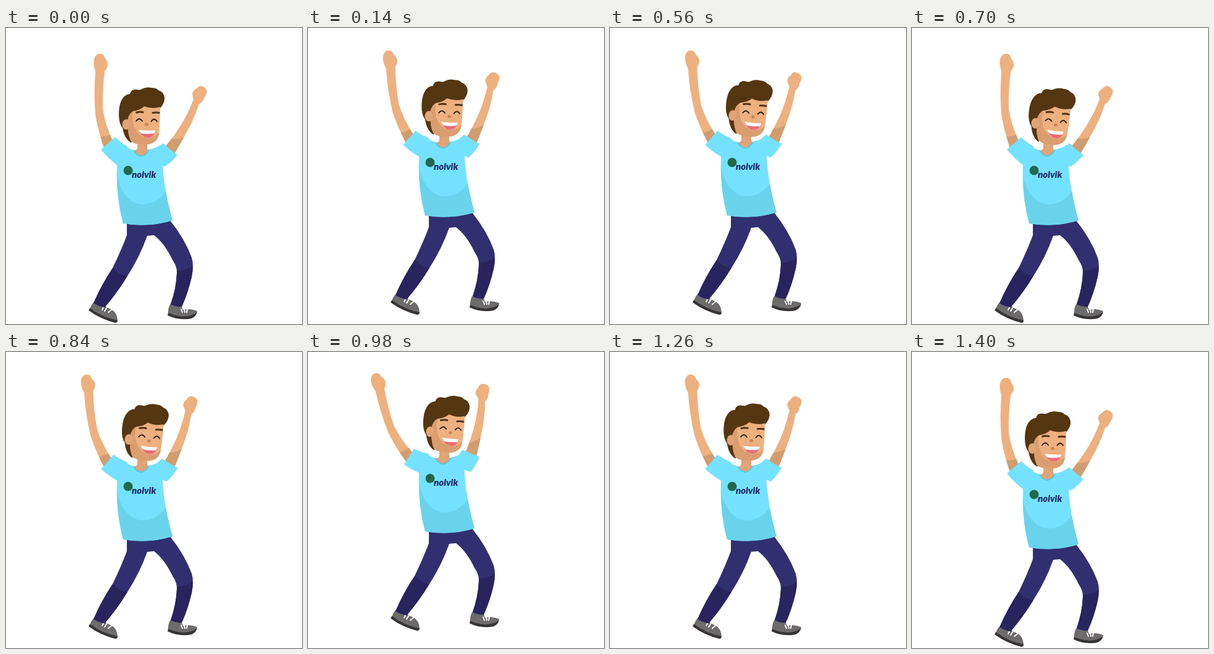
Write an HTML page that moves like this. It is 480 by 480 pixels and loops after 1470 ms.

```html
<!DOCTYPE html>
<html lang="en">
<head>
<meta charset="utf-8">
<title>Cheering dancer</title>
<style>
html, body { margin: 0; width: 100%; height: 100%; overflow: hidden; background: #fff; }
svg { display: block; width: 100vw; height: 100vh; }
</style>
</head>
<body>
<svg viewBox="0 0 480 480">
  <defs>
    <clipPath id="torsoClip"><use href="#torso"/></clipPath>
    <clipPath id="faceClip"><use href="#face"/></clipPath>
    <clipPath id="legsClip"><use href="#legs"/></clipPath>
    <clipPath id="armLClip"><use href="#skinL"/></clipPath>
    <clipPath id="armRClip"><use href="#skinR"/></clipPath>
  </defs>
  <g id="body">
    <!-- shoes -->
    <path fill="#6d6b6c" d="M143 444 L160 450 Q166 455 172 457 Q180 462 181 474 L179 476 Q156 469 136 456 Q138 448 143 444Z"/>
    <path fill="#363435" d="M136 454 Q155 469 181 474 Q181 478 177 478 Q153 472 134 458Z"/>
    <path fill="#6d6b6c" d="M266 448 L284 449 L287 457 Q299 454 310 459 Q310 464 303 468 L288 470 L263 465 Q262 456 266 448Z"/>
    <path fill="#363435" d="M263 462 Q274 467 288 468 Q302 467 310 461 Q308 468 301 471 Q281 475 262 466Z"/>
    <path stroke="#fff" stroke-width="2" stroke-linecap="round" fill="none"
      d="M160 449 L156 457 M165 451 L160 459 M172 456 L166 461 M284 456 L286 461 M289 456 L290 461 M294 456 L293 461"/>
    <!-- trousers -->
    <path id="legs" fill="#312f6f" d="M196 312 L266 312 Q290 342 301 372 Q305 384 301 404 Q295 430 285 452 Q275 452 267 448 Q276 422 277 398 Q278 388 270 376 Q257 349 240 336 L229 337 Q217 371 197 402 Q180 430 160 453 Q149 451 142 446 Q155 416 173 389 Q187 360 196 336Z"/>
    <path clip-path="url(#legsClip)" fill="#29245d" d="M173 389 Q183 401 200 403 L165 460 L130 450Z M270 393 Q289 396 305 384 L305 460 L260 455Z"/>
    <!-- arms -->
    <g class="armR">
      <path id="skinR" fill="#eeb07f" d="M304 116 L302 107 Q303 101 308 99 Q312 94 317 94 Q325 97 326 103 Q325 109 321 114 Q319 121 313 123 Q304 151 289 176 Q281 191 268 212 L254 198 Q276 171 288 150 Q298 132 304 116Z"/>
      <path clip-path="url(#armRClip)" fill="#d19d70" d="M264 179 Q282 182 295 173 L290 215 L250 215Z"/>
    </g>
    <g class="armL">
      <path id="skinL" fill="#eeb07f" d="M145 70 Q141 59 143 50 Q145 44 150 42 Q156 41 159 45 L161 50 Q165 54 165 61 Q163 67 160 70 Q156 102 157 132 Q161 157 173 183 L163 205 Q150 172 145 141 Q142 107 145 70Z"/>
      <path clip-path="url(#armLClip)" fill="#d19d70" d="M145 175 Q158 179 176 170 L185 210 L150 210Z"/>
    </g>
    <!-- shirt and neck -->
    <path id="torso" fill="#74e2fe" d="M190 189 Q198 196 207 198 Q219 215 232 197 Q243 195 250 190 L254 222 Q256 262 270 312 Q232 324 190 317 Q178 273 180 222Z"/>
    <path clip-path="url(#torsoClip)" fill="#6ad3ec" d="M178 226 C182 266 202 286 222 286 Q246 286 263 260 L280 330 H170Z"/>
    <path fill="#e0a476" d="M213 178 H229 V194 Q229 198 232 198 Q219 215 207 199 Q213 198 213 194Z"/>
    <path fill="none" stroke="#5cc3dc" stroke-width="2" d="M207 199 Q219 217 232 198"/>
    <path class="armL" fill="#74e2fe" d="M177 177 L154 197 Q166 212 181 223 L198 215 L197 192 Q186 186 177 177Z"/>
    <path class="armR" fill="#74e2fe" d="M255 187 Q267 198 278 206 Q268 218 257 225 L246 218 L240 200 L246 193Z"/>
    <circle cx="198" cy="231" r="7.5" fill="#20694a"/>
    <text x="204" y="242.500" fill="#20286a" font-family="Lato, sans-serif" font-size="15" font-weight="900" font-style="italic">nolvik</text>
    <!-- head -->
    <g id="head">
      <path fill="#543611" d="M203 186 Q192 180 189 162 Q183 155 183 140 Q183 118 193 110 Q197 107 201 107 Q203 98 213 100 Q218 101 220 99 Q228 95 236 97 Q244 97 247 101 Q255 103 257 112 Q258 121 250 130 L225 150Z"/>
      <path id="face" fill="#edb07f" d="M197 150 Q199 139 206 135 Q218 133 224 127 Q238 132 250 128 Q250 151 248 171 Q246 187 228 189 Q211 190 203 184 Q198 174 198 164Z"/>
      <path clip-path="url(#faceClip)" fill="#d99d70" d="M193 130 L205 135 V148 Q208 174 229 179 Q242 179 252 166 V192 H193Z"/>
      <ellipse cx="195" cy="156.5" rx="6.500" ry="8.5" fill="#e0a476"/>
      <path stroke="#51331a" stroke-width="3" stroke-linecap="round" fill="none" d="M211.500 137 Q217 135.500 222 136.500 M238 137.500 Q243 136.500 248 137.500"/>
      <path stroke="#221a16" stroke-width="1.8" stroke-linecap="round" fill="none" d="M211 151 Q216 144 221 151 M235.500 151.500 Q240 144.500 245 151.500"/>
      <ellipse cx="228" cy="156.500" rx="3" ry="2.500" fill="#c58557"/>
      <path fill="#ea6c79" d="M215 165 Q229 167 242 166 Q240 178 230 178 Q219 177 215 165Z"/>
      <path fill="#fff" d="M215 165 Q229 167 242 166 Q242 169 240 171 Q229 172.500 219 171 Q216 168 215 165Z"/>
    </g>
  </g>
</svg>
<script>
const STEP = 70, COUNT = 21;
const body = document.getElementById("body");
const head = document.getElementById("head");
const armL = document.querySelectorAll(".armL");
const armR = document.querySelectorAll(".armR");

// Rises 0..half, then falls back, one unit per step.
const swing = (n, half) => half - Math.abs(n % (2 * half) - half);

function turn(el, deg, x, y) {
  el.setAttribute("transform", `rotate(${deg} ${x} ${y})`);
}

function draw(ms) {
  const n = Math.floor(ms / STEP) % COUNT;
  const lift = swing(n, 5);
  body.setAttribute("transform", `translate(0 ${-6.5 * lift})`);
  armL.forEach(el => turn(el, -4.3 * lift, 193, 197));
  armR.forEach(el => turn(el, -4.3 * lift, 245, 200));
  turn(head, 0.5 * swing(n, 10), 221, 212);
}

const start = performance.now();
function tick() {
  draw(performance.now() - start);
  requestAnimationFrame(tick);
}
tick();
</script>
</body>
</html>
```
